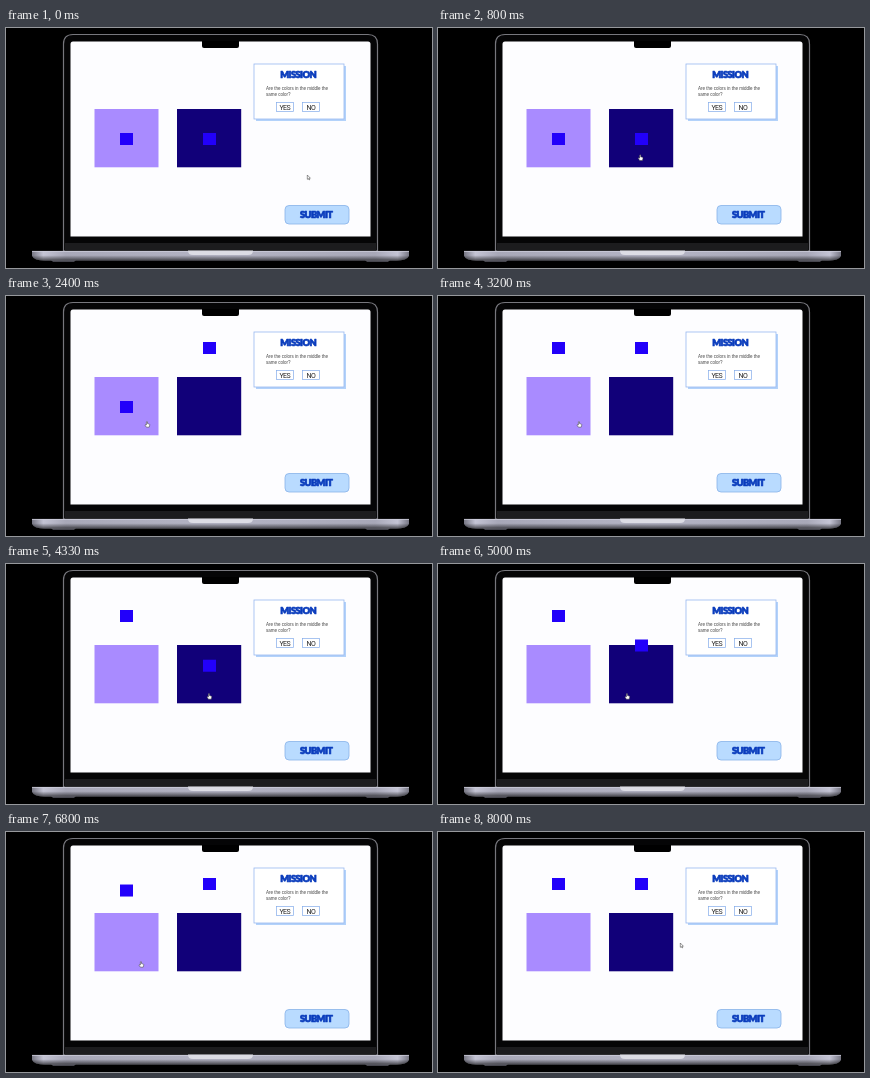
Recreate the animation shown at these times as an HTML page. Size 426 by 240 pixels, loop 8070 ms.

```html
<!DOCTYPE html>
<html lang="en">
<head>
<meta charset="utf-8">
<title>Color mission</title>
<style>
html, body { margin: 0; width: 100%; height: 100%; overflow: hidden; background: #000; }
svg { display: block; width: 100vw; height: 100vh; }
text { text-anchor: middle; }
.heavy { font: 900 9.3px Lato, sans-serif; fill: #0a3cbc; stroke: #0a3cbc; stroke-width: .7; stroke-linejoin: round; letter-spacing: -.55px; }
.small { font: 4.5px "Liberation Sans", Arial, sans-serif; fill: #444; text-anchor: start; }
.answer { font: 7px Roboto, sans-serif; fill: #222; letter-spacing: -.5px; }
.option { fill: #fff; stroke: #83acea; stroke-width: .7; }
.pointer { fill: #fff; stroke: #333; stroke-width: .5; stroke-linejoin: round; }
</style>
</head>
<body>
<svg viewBox="0 0 426 240">
  <defs>
    <linearGradient id="metal">
      <stop offset="0" stop-color="#777784"/>
      <stop offset=".03" stop-color="#c4c4d4"/>
      <stop offset=".09" stop-color="#a8a8b8"/>
      <stop offset=".5" stop-color="#b4b4c4"/>
      <stop offset=".91" stop-color="#a8a8b8"/>
      <stop offset=".97" stop-color="#c4c4d4"/>
      <stop offset="1" stop-color="#777784"/>
    </linearGradient>
    <linearGradient id="shade" x2="0" y2="1">
      <stop offset=".45" stop-color="#000" stop-opacity="0"/>
      <stop offset="1" stop-color="#000" stop-opacity=".6"/>
    </linearGradient>
  </defs>

  <!-- laptop -->
  <path d="M57.5 223V16Q57.5 6.5 67 6.5H362Q371.5 6.5 371.5 16V223Z" fill="#050506" stroke="#77777d" stroke-width="1.2"/>
  <rect x="59" y="215" width="311" height="8" fill="#1c1c1e"/>
  <path d="M64.5 208.5V16Q64.5 13.5 67 13.5H362Q364.5 13.5 364.5 16V208.5Z" fill="#fdfdff"/>
  <path d="M196 13H233V18Q233 20 231 20H198Q196 20 196 18Z" fill="#000"/>
  <path d="M45 232H70L68 234H47ZM359 232H384L382 234H361Z" fill="#46464e"/>
  <path d="M26 223H403V228Q401 232.5 390 232.5H39Q28 232.5 26 228Z" fill="url(#metal)"/>
  <path d="M26 223H403V228Q401 232.5 390 232.5H39Q28 232.5 26 228Z" fill="url(#shade)"/>
  <path d="M26 223.4H403" stroke="#d0d0de" stroke-width=".8"/>
  <path d="M182 222.5H247Q247 227 242 227H187Q182 227 182 222.5Z" fill="#dcdce4"/>

  <!-- mission card -->
  <rect x="250" y="38" width="90" height="55" fill="#b3d2fa"/>
  <rect x="248" y="36" width="90" height="55" fill="#fff" stroke="#98b8ef" stroke-width=".8"/>
  <text class="heavy" x="292.2" y="50.3">MISSION</text>
  <text class="small" x="260" y="62">Are the colors in the middle the</text>
  <text class="small" x="260" y="67.5">same color?</text>
  <rect class="option" x="270.5" y="74.5" width="17" height="9"/>
  <rect class="option" x="296.5" y="74.5" width="17" height="9"/>
  <text class="answer" x="278.8" y="81.6">YES</text>
  <text class="answer" x="304.8" y="81.6">NO</text>

  <rect x="279" y="177.5" width="64" height="18.5" rx="4" fill="#b9dbff" stroke="#88b3e9" stroke-width=".8"/>
  <text class="heavy" x="310.2" y="189.5">SUBMIT</text>

  <!-- color boxes -->
  <rect x="88.5" y="81" width="64" height="58.3" fill="#a98bff"/>
  <rect x="171" y="81" width="64.2" height="58.3" fill="#110079"/>
  <rect id="left" x="114" width="13" height="12" fill="#2200fa"/>
  <rect id="right" x="197" width="13" height="12" fill="#2200fa"/>

  <g id="cursor">
    <path id="arrow" class="pointer" d="M-.7 -2V2.3L.3 1.5L1 3L1.7 2.7L1.1 1.2H2.4Z"/>
    <path id="hand" class="pointer" d="M-.6 -2.2Q0 -2.9 .5 -2.2V-.4L2.3 .1Q2.9 .4 2.7 1.2L2.2 3.2H-.6L-2 1.1Q-1.9 .2 -.6 .9Z"/>
  </g>
</svg>
<script>
const LOOP = 8070, STEP = 1000 / 15, HOME = 105, UP = 46;

// Keys are [time, ...values]
const rightKeys = [[850, HOME], [1550, UP], [3815, UP], [4515, HOME], [4650, HOME], [5350, UP]];
const leftKeys = [[2400, HOME], [3100, UP], [5407, UP], [6107, HOME], [6251, HOME], [6951, UP]];
const cursorKeys = [
  [150, 302, 149], [850, 201, 129], [1700, 201, 129], [2350, 141, 128], [3200, 141, 128],
  [3750, 203, 132], [4850, 203, 132], [5350, 135, 132], [7000, 135, 132], [7900, 243, 113]
];

const el = id => document.getElementById(id);
const ease = p => (1 - Math.cos(Math.PI * p)) / 2;

function valuesAt(keys, t) {
  const next = keys.findIndex(k => k[0] > t);
  if (next === 0) return keys[0].slice(1);
  if (next < 0) return keys[keys.length - 1].slice(1);
  const a = keys[next - 1], b = keys[next];
  const p = ease((t - a[0]) / (b[0] - a[0]));
  return a.slice(1).map((v, i) => v + (b[i + 1] - v) * p);
}

function draw(now) {
  const t = Math.floor((now % LOOP + 5) / STEP) * STEP;
  el("left").setAttribute("y", valuesAt(leftKeys, t)[0]);
  el("right").setAttribute("y", valuesAt(rightKeys, t)[0]);

  const [x, y] = valuesAt(cursorKeys, t);
  const overBox = y > 81 && y < 139.3 && (x > 88.5 && x < 152.5 || x > 171 && x < 235);
  el("cursor").setAttribute("transform", `translate(${x} ${y})`);
  el("hand").style.display = overBox ? "" : "none";
  el("arrow").style.display = overBox ? "none" : "";
}

const start = performance.now();
function tick() {
  draw(performance.now() - start);
  requestAnimationFrame(tick);
}
tick();
</script>
</body>
</html>
```
